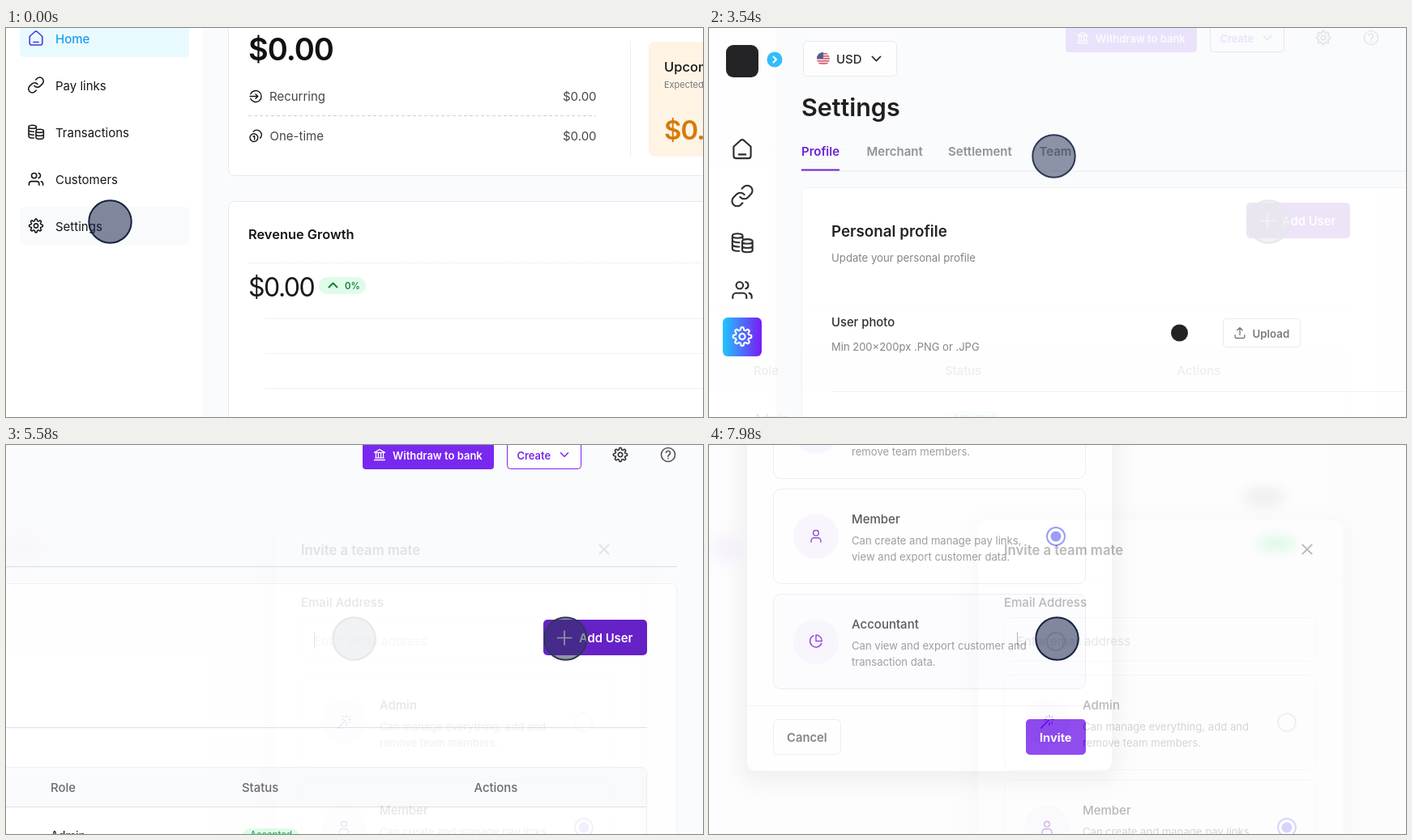
Animation of 860 by 481 pixels, one loop 8000 ms. Source, as an HTML page:

```html
<!DOCTYPE html>
<html lang="en">
<head>
<meta charset="utf-8">
<title>Inviting a team mate</title>
<style>
html, body { margin: 0; height: 100%; overflow: hidden; background: #fff; }
svg { display: block; width: 100vw; height: 100vh; font-family: Inter, "Open Sans", sans-serif; }
.icon { fill: none; stroke-width: 2; stroke-linecap: round; stroke-linejoin: round; }
text { white-space: pre; }
</style>
</head>
<body>
<svg id="stage" viewBox="0 0 860 481"></svg>
<script>
const INK = '#161618', GREY = '#77777c', PURPLE = '#6a0fee', LINE = '#e7e8ed', PAGE = '#fafbfd';

const text = (x, y, size, str, fill = INK, weight = 400, spacing = 0) =>
  `<text x="${x}" y="${y}" font-size="${size}" fill="${fill}" font-weight="${weight}" letter-spacing="${spacing}">${str}</text>`;
const box = (x, y, w, h, r, fill, stroke = 'none', extra = '') =>
  `<rect x="${x}" y="${y}" width="${w}" height="${h}" rx="${r}" fill="${fill}" stroke="${stroke}" ${extra}/>`;
const line = (x1, y1, x2, y2, color = LINE, extra = '') =>
  `<path d="M${x1} ${y1}L${x2} ${y2}" stroke="${color}" ${extra}/>`;
const disc = (x, y, r, fill, stroke = 'none', width = 2) =>
  `<circle cx="${x}" cy="${y}" r="${r}" fill="${fill}" stroke="${stroke}" stroke-width="${width}"/>`;
const blob = (x, y, rx, ry, fill) =>
  `<ellipse cx="${x}" cy="${y}" rx="${rx}" ry="${ry}" fill="${fill}" filter="url(#soft)"/>`;
const cursor = (x, y) => disc(x, y, 26.2, 'rgba(18,29,68,.52)', '#14213f');

// Cog outline: eight rounded teeth
const cog = 'M' + Array.from({ length: 96 }, (_, i) => {
  const a = i / 96 * 2 * Math.PI, r = 9.3 + 1.5 * Math.tanh(2.2 * Math.cos(8 * a));
  return `${(r * Math.sin(a)).toFixed(2)} ${(-r * Math.cos(a)).toFixed(2)}`;
}).join('L') + 'Z';
const ring = (x, y, r) => `M${x - r} ${y}a${r} ${r} 0 1 0 ${2 * r} 0a${r} ${r} 0 1 0 ${-2 * r} 0`;

// Outline icons, centred on 0,0 in a 24 unit box
const shapes = {
  home: 'M-10-2.5L-2-10Q0-11.6 2-10L10-2.5V8Q10 11 7 11H-7Q-10 11-10 8ZM-4 6.5H4',
  link: 'M-2.500 1.200a6 6 0 0 0 9 .6l3.600-3.600a6 6 0 0 0-8.500-8.500l-2 2M2.500-1.200a6 6 0 0 0-9-.6l-3.600 3.600a6 6 0 0 0 8.500 8.500l2-2',
  coins: 'M-11.5-8c0-3.5 12-3.5 12 0s-12 3.5-12 0v15c0 2 4 2.8 8 2.7M.5-8v3M-11.5-3c0 2 4 2.8 8 2.7M-11.5 2c0 2 4 2.8 8 2.7' +
    'M0-1.5c0-3.5 12-3.5 12 0s-12 3.5-12 0v10c0 3.5 12 3.5 12 0v-10M0 3.5c0 3.5 12 3.5 12 0',
  users: 'M5 10V8a4 4 0 0 0-4-4H-7a4 4 0 0 0-4 4v2M11 10V8a4 4 0 0 0-3-3.87M4-8.9a4 4 0 0 1 0 7.75' + ring(-3, -5, 4),
  user: 'M-8 10V8a5 5 0 0 1 5-5H3a5 5 0 0 1 5 5v2' + ring(0, -5, 4.5),
  cog: cog + ring(0, 0, 3.4),
  down: 'M-6-3L0 3L6-3',
  cross: 'M-6-6L6 6M6-6L-6 6',
  plus: 'M-10 0H10M0-10V10',
  upload: 'M-9 4V7Q-9 10-6 10H6Q9 10 9 7V4M0 4V-10M-5-5L0-10L5-5',
  bank: 'M-10-4L0-10L10-4ZM-10 10H10M-8 6H8M-7-3V5M-2.4-3V5M2.4-3V5M7-3V5',
  enter: 'M-9-4A10 10 0 1 1-9 4M-10 0H4M0-4L4 0L0 4',
  coin: ring(-3, 3, 7) + 'M-4-8A7.5 7.5 0 1 1 8 4M-4 1L-2 0V6',
  help: ring(0, 0, 10) + 'M-3-3A3 3 0 1 1 1.5 0Q0 1 0 2.5M0 5.5V5.6',
  wand: 'M-10 10L3-3M4-11V-8M4 2V5M-4-4H-1M8-4H11M-1-9L0-8M9-9L8-8M9 2L8 1',
  pie: 'M9.2 3.9A10 10 0 1 1-4-9.2M10 0A10 10 0 0 0 0-10V0Z'
};
const icon = (name, x, y, scale, color = INK) =>
  `<path class="icon" d="${shapes[name]}" stroke="${color}" transform="translate(${x} ${y}) scale(${scale})"/>`;

const defs = `<defs>
  <linearGradient id="brand"><stop stop-color="#06c0ff"/><stop offset="1" stop-color="#6a00f5"/></linearGradient>
  <linearGradient id="homeText"><stop stop-color="#12a8ec"/><stop offset="1" stop-color="#2494f4"/></linearGradient>
  <filter id="soft" x="-1" y="-1" width="3" height="3"><feGaussianBlur stdDeviation="7"/></filter>
  <filter id="shadow" x="-.2" y="-.2" width="1.4" height="1.4"><feGaussianBlur stdDeviation="13"/></filter>
  <clipPath id="flag"><circle cx="141" cy="38" r="8"/></clipPath>
</defs>`;

const menu = [['home', 'Home'], ['link', 'Pay links'], ['coins', 'Transactions'], ['users', 'Customers'], ['cog', 'Settings']];

function dashboard() {
  return box(0, 0, 860, 481, 0, PAGE) + box(0, 0, 242, 481, 0, '#fff') +
    box(17, -10, 209, 46, 5, '#e9faff') + box(17, 221, 209, 47, 5, '#f9fafc') +
    menu.map(([name, label], i) =>
      icon(name, 37, 12.5 + 58 * i, .78, i ? INK : '#4a35dd') +
      text(61, 18.5 + 58 * i, 15, label, i ? INK : 'url(#homeText)', i ? 400 : 500)).join('') +
    box(274.5, -20, 620, 202.5, 7, '#fff', LINE) + box(274.5, 214.5, 620, 300, 7, '#fff', LINE) +
    text(299, 40, 38, '$0.00', '#111114', 600, -1) +
    icon('enter', 308, 84.5, .7) + text(325, 90, 15, 'Recurring', '#46464b') +
    line(299, 108.5, 728, 108.5, '#cfd0d6', 'stroke-dasharray="4 3"') +
    icon('coin', 308, 133.5, .7) + text(325.5, 139, 15, 'One-time', '#46464b') +
    text(687, 90, 15, '$0.00', '#46464b') + text(687, 139, 15, '$0.00', '#46464b') +
    line(770.5, 16, 770.5, 160, '#eeeff3') +
    box(793.5, 18, 120, 140, 7, '#fff4e4', '#fdeed8') +
    text(812, 53.5, 16.5, 'Upcoming', INK, 500) + text(812, 74, 11, 'Expected', GREY) +
    text(812, 138, 33, '$0.00', '#d67a0b', 600, -1) +
    text(299, 261, 16.4, 'Revenue Growth', INK, 600) +
    line(299, 290.5, 860, 290.5, '#ecedf1', 'stroke-dasharray="3 1"') +
    text(299, 332, 32, '$0.00', '#18181b', 400, -1.5) +
    box(386, 308, 58, 21, 10.5, '#dffce9') +
    `<path class="icon" d="M398.5 320.5l5-5 5 5" stroke="#15803d"/>` +
    text(418, 322.5, 11.3, '0%', '#15803d', 600) +
    [359.5, 402.5, 445.5].map(y => line(320, y, 860, y, '#f0f1f4')).join('') +
    cursor(128.5, 239.5);
}

function settings() {
  const stripes = [31, 34, 37, 40, 43].map(y => box(133, y, 16, 1.6, 0, '#d6455a')).join('');
  const tabs = [[194.5, 'Merchant'], [295, 'Settlement'], [407.5, 'Team']];
  return box(0, 0, 860, 481, 0, PAGE) + box(0, 0, 82, 481, 0, '#fff') +
    box(21, 21, 40, 40, 9, '#0b0b0d') + disc(81, 39, 9.5, '#1cb5fb') +
    `<path class="icon" d="M79.5 35.5l3.500 3.500-3.500 3.500" stroke="#fff"/>` +
    box(17, 358, 48, 48, 6, 'url(#brand)') +
    menu.map(([name], i) => icon(name, 41, 149.5 + 58 * i, 1.06, i < 4 ? INK : '#fff')).join('') +
    box(116.5, 16.5, 115, 43, 5, '#fff', LINE) +
    `<g clip-path="url(#flag)">${box(133, 30, 16, 16, 0, '#f3eef1')}${stripes}${box(133, 30, 8, 8, 0, '#3c4c86')}</g>` +
    text(157, 44, 15, 'USD', INK, 500) + icon('down', 206.5, 38, .85) +
    text(114, 108.5, 30.5, 'Settings', '#060607', 600) +
    line(114, 177, 860, 177, '#e5e7ec') + box(114, 174.5, 47, 2, 0, '#5b0ad2') +
    text(114, 158, 15, 'Profile', '#5b0ad2', 600) +
    tabs.map(([x, label]) => text(x, 158, 15, label, '#87878c', 600)).join('') +
    box(114.5, 197.5, 800, 320, 6, '#fff', '#eff0f4') +
    text(151, 258, 18.8, 'Personal profile', '#0a0a0b', 600) +
    text(151, 288.5, 13.2, 'Update your personal profile', GREY) +
    text(151, 369, 14.8, 'User photo', INK, 500) +
    text(151, 399, 13, 'Min 200×200px .PNG or .JPG', GREY) +
    disc(580.5, 377, 10.5, '#0b0b0d') +
    box(634.5, 359.5, 95, 35, 4, '#fff', LINE) + icon('upload', 655, 377, .65, '#6b6b70') +
    text(670.5, 382.5, 13.3, 'Upload', '#6b6b70', 600) +
    line(151, 449.5, 860, 449.5, '#eff0f4') + cursor(425.5, 158.5);
}

function team() {
  return box(0, 0, 860, 481, 0, PAGE) +
    box(440, -10, 162, 40, 4, PURPLE) + icon('bank', 461, 12, .65, '#fff') +
    text(477, 17.5, 13, 'Withdraw to bank', '#fff', 600) +
    box(618.5, -10, 91, 39.5, 4, '#fff', PURPLE) + text(630.5, 17.5, 12.9, 'Create', PURPLE, 600) +
    icon('down', 689, 12, .75, PURPLE) + icon('cog', 758, 12, .8) + icon('help', 817, 12, .85, '#44444a') +
    line(0, 150.5, 828, 150.5, '#d9dbe1') +
    box(-20, 171.5, 847.5, 340, 6, '#fff', '#eff0f4') +
    box(663, 216, 128, 44, 5, '#5508c0') + icon('plus', 689, 238.5, .85, '#fff') +
    text(707, 244, 14.8, 'Add User', '#fff', 600) +
    line(0, 349.5, 791, 349.5, '#dddee4') +
    box(-20, 398.5, 810.5, 120, 6, '#fff', '#eeeff3') +
    box(-20, 399, 810, 48, 5, '#f9fafc') + line(0, 447.5, 790, 447.5, '#dddee4') +
    [[55, 'Role'], [291, 'Status'], [577.5, 'Actions']].map(([x, label]) => text(x, 429, 14.9, label, '#5b5b61', 500)).join('') +
    text(55, 488, 14, 'Admin', INK, 500) +
    box(291, 474, 71, 22, 11, '#d9fbe5') + text(301, 486, 11.3, 'Accepted', '#16a34a', 500) +
    cursor(690.5, 239.5);
}

function role(y, name, glyph, lines, chosen, fill = '#fff') {
  const tone = chosen ? '#7473f5' : '#d4d4da';
  return box(364.5, y + .5, 385, 117, 9, fill, '#e8e8ed') +
    disc(417, y + 59, 28, '#f6f3fd') + icon(glyph, 417, y + 58.5, .74, '#6508cc') +
    text(461, y + 43, 15, name, INK, 500) +
    lines.map((row, i) => text(461, y + 69 + 20 * i, 13.1, row, GREY)).join('') +
    disc(713, y + 59, 11, '#fff', tone) + (chosen ? disc(713, y + 59, 6.5, tone) : '');
}

function dialog() {
  return box(325, 90, 464, 686, 16, 'rgba(0,0,0,.07)', 'none', 'filter="url(#shadow)"') +
    box(332, 93, 450, 670, 11, '#fff') + line(332, 163.5, 782, 163.5, '#f7f7f9') +
    text(364, 136, 16.7, 'Invite a team mate', INK, 600) + icon('cross', 738, 129, .95) +
    text(364, 200, 15, 'Email Address', INK, 500) +
    box(364.5, 213.5, 385, 54, 6, '#fff', '#e8e8ed') +
    text(380, 248, 15, 'Enter email address', '#aeaeb3') + line(380.5, 231, 380.5, 252, '#111') +
    role(284, 'Admin', 'wand', ['Can manage everything, add and', 'remove team members.']) +
    role(414, 'Member', 'user', ['Can create and manage pay links,', 'view and export customer data.'], true) +
    role(544, 'Accountant', 'pie', ['Can view and export customer and', 'transaction data.'], false, '#fcfcff') +
    line(332, 682.5, 782, 682.5, '#f1f1f4') +
    box(364.5, 699.5, 83, 43, 5, '#fff', LINE) + text(381, 727, 14.8, 'Cancel', '#515156', 600) +
    box(676, 699, 74, 44, 5, '#6002e8') + text(693, 727, 14.6, 'Invite', '#fff', 700);
}

const invite = () => box(0, 0, 860, 481, 0, '#fdfdfe') +
  blob(22, 128, 24, 20, '#f1e5fd') + blob(22, 128, 9, 5, '#e3cdfa') + dialog() + cursor(429.5, 239.5);

const inviteEnd = () => box(0, 0, 860, 481, 0, '#fdfdfd') +
  blob(685, 64, 26, 13, '#ececee') + blob(700, 122, 26, 10, '#d5f6df') +
  `<g transform="translate(-285 -360)">${dialog()}</g>` + cursor(429.5, 239.5);

const stage = document.getElementById('stage');
stage.innerHTML = defs + [dashboard, settings, team, invite, inviteEnd].map(scene => `<g class="scene">${scene()}</g>`).join('');
const scenes = [...stage.querySelectorAll('.scene')];

const LOOP = 8000, STEP = 60, FADE_STEPS = 10, FIRST_FADE = 1500, PERIOD = 2040;

function draw() {
  const t = performance.now() % LOOP;
  scenes.forEach((scene, i) => {
    if (!i) return;
    const start = FIRST_FADE + (i - 1) * PERIOD;
    const steps = Math.floor((t - start) / STEP) + 1;
    scene.setAttribute('opacity', Math.max(0, Math.min(1, steps / FADE_STEPS)));
  });
  requestAnimationFrame(draw);
}
draw();
</script>
</body>
</html>
```
